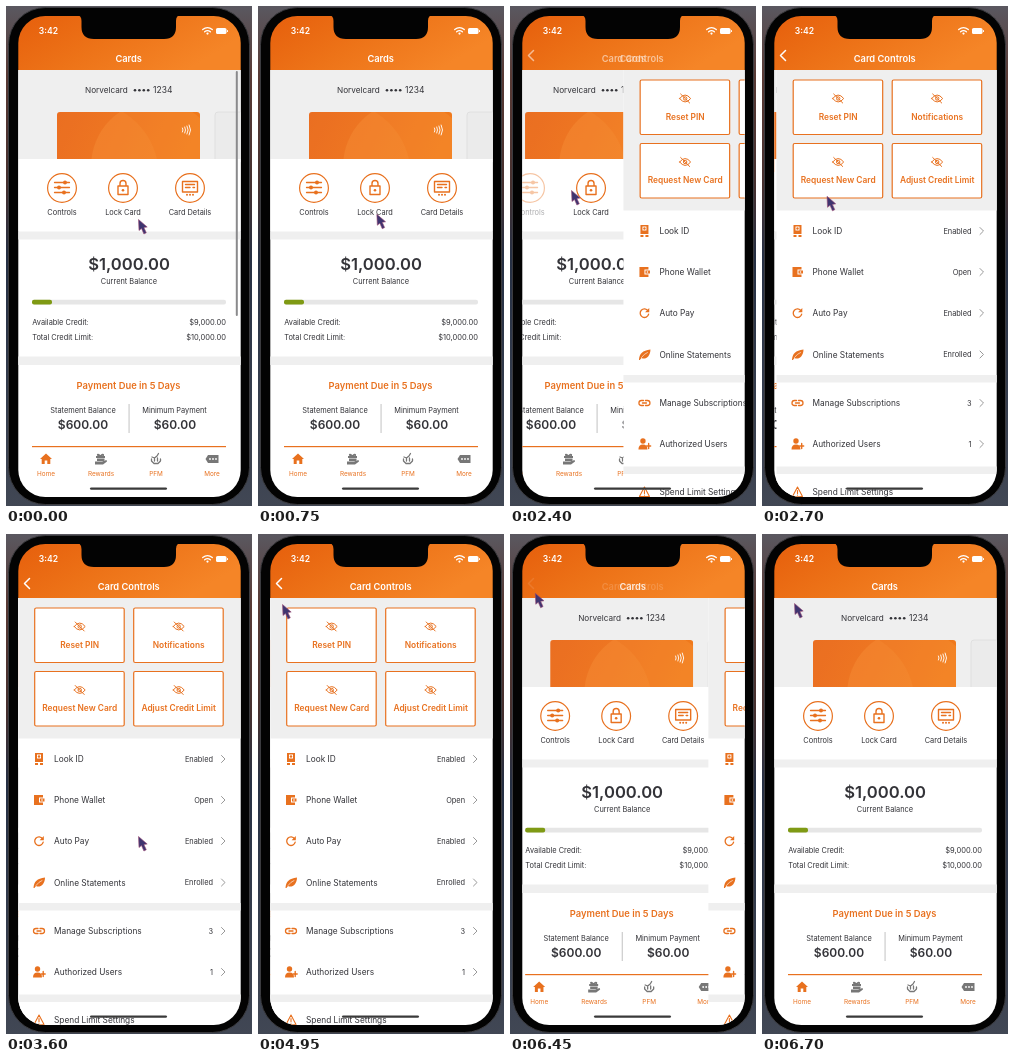
Write an HTML page that moves like this. It is 246 by 500 pixels and loops after 6.75 s.

```html
<!DOCTYPE html>
<html lang="en">
<head>
<meta charset="utf-8">
<title>Card controls</title>
<style>
  html, body { margin: 0; width: 100%; height: 100%; overflow: hidden; background: #0d1320; }
  svg { display: block; width: 246px; height: 500px; }
  text { font-family: Inter, Roboto, sans-serif; }
</style>
</head>
<body>
<svg id="stage" viewBox="0 0 246 500"></svg>
<script>
const ORANGE = '#e8711f', INK = '#333338', GRAY = '#efefef', DIM = '#777';

const text = (x, y, str, size = 7.5, o = {}) =>
  `<text x="${x}" y="${y}" font-size="${size}" fill="${o.fill || INK}" font-weight="${o.weight || 400}" text-anchor="${o.anchor || 'middle'}">${str}</text>`;
const rect = (x, y, w, h, fill, rx = 0, more = '') =>
  `<rect x="${x}" y="${y}" width="${w}" height="${h}" fill="${fill}" rx="${rx}" ${more}/>`;
const band = (y, h, fill) => rect(12, y, 223, h, fill);
const line = (d, color = ORANGE, width = 1) =>
  `<path d="${d}" fill="none" stroke="${color}" stroke-width="${width}" stroke-linecap="round" stroke-linejoin="round"/>`;
const solid = (d, color = ORANGE) => `<path d="${d}" fill="${color}" fill-rule="evenodd"/>`;
const dot = (x, y, r, fill = ORANGE) => `<circle cx="${x}" cy="${y}" r="${r}" fill="${fill}"/>`;
const at = (x, y, body) => `<g transform="translate(${x} ${y})">${body}</g>`;

// Icons are drawn around their own centre
const icons = {
  sliders: line('M-7.5-5H7.5M-7.5 0H7.5M-7.5 5H7.5', ORANGE, 1.3) + dot(3, -5, 2) + dot(-3, 0, 2) + dot(2, 5, 2),
  lock: line('M-5-1.5H5V7H-5ZM-3-1.5V-4A3 3 0 0 1 3-4V-1.5', ORANGE, 1.4) + dot(0, 2.7, 1.3),
  details: line('M-7.5-6H7.5V4.5H-7.5Z', ORANGE, 1.4) + line('M-4.5-3H4.5M-4.5 0H0M3 0H4.5', ORANGE, 1.4) + dot(-3, 7.3, 1) + dot(0, 7.3, 1) + dot(3, 7.3, 1),
  home: solid('M0-5.5L6 0H4.3V5H1.3V1.5H-1.3V5H-4.3V0H-6Z'),
  gift: solid('M-5-3H4V-1H-5ZM-4-.5H3.5V2H-4ZM-6 2.5H1L5.5 1L6 2.5L2 5.5H-6Z', DIM) + line('M-.5-3C-5-7-4-2-.5-3C3-7 4-2-.5-3', DIM, 1.2),
  chart: line('M-4.5 0V2L-2 4.5H2L4.5 2V0M-1.5 0V2M1.5-1V2M-4-2L-1.5-1L1-3L2.5-5.5', DIM, 1.3),
  more: solid('M-6.5 0L-4-4H6.5V4H-4Z', DIM) + dot(-2, 0, .9, '#fff') + dot(1, 0, .9, '#fff') + dot(4, 0, .9, '#fff'),
  eye: line('M-5.5 0Q0-7 5.5 0Q0 7-5.5 0ZM-4.5-4.5L4.5 4.5', ORANGE, 1) + `<circle r="1.7" fill="none" stroke="${ORANGE}"/>`,
  scan: solid('M-4-6H4V3H-4ZM-2-4.5V-.5H2V-4.5ZM-4 4H-1V6H-4ZM1 4H4V6H1Z') + dot(0, -2.5, 1.2),
  wallet: solid('M-5-5H4V-2.5H0V2.5H4V5H-5ZM1-1.6H5.5V1.6H1Z') + dot(3, 0, .8, '#fff'),
  refresh: line('M3.6-2.2A4.3 4.3 0 1 0 4.2 1.2', ORANGE, 1.3) + solid('M4.8-5V-.8H.6Z'),
  leaf: solid('M-5.5 5.5C-5-1-2-4 6-5C6 2 1 5.5-3 3.5L-4.6 5.6Z') + line('M-3 3Q0-1 3-2', '#fff', .6),
  link: line('M-1-2.5H-3A2.5 2.5 0 0 0-3 2.5H-1M1-2.5H3A2.5 2.5 0 0 1 3 2.5H1M-2 0H2', ORANGE, 1.3),
  users: dot(-1.5, -3, 2.7) + solid('M-6 5.5Q-6 .5-1.5.5Q3 .5 3 5.5Z') + line('M4.2-.5V4.5M2.2 2H6.2', ORANGE, 1.4),
  warn: line('M0-5L5 4.5H-5ZM0-1.5V1.5M0 3V3.1', ORANGE, 1.1)
};

const action = (x, icon, label, id = '') =>
  `<g ${id && `id="${id}"`}><circle cx="${x}" cy="182" r="14.4" fill="#fff" stroke="${ORANGE}" stroke-width="1.2"/>` +
  at(x, 181.5, icons[icon]) + text(x, 209, label, 7.4) + '</g>';
const tab = (x, icon, label) => at(x, 453, icons[icon]) + text(x, 470, label, 6.4, { fill: ORANGE });
const tile = (x, y, label) =>
  rect(x, y, 89.5, 54.5, '#fff', 1.5, `stroke="${ORANGE}" stroke-width="1.2"`) +
  at(x + 45, y + 18.5, icons.eye) + text(x + 45, y + 39.5, label, 8.4, { fill: ORANGE, weight: 600 });
const row = (y, icon, label, value) =>
  at(33, y, icons[icon]) + text(48, y + 3, label, 8.3, { anchor: 'start' }) +
  (value ? text(207, y + 2.8, value, 7.4, { anchor: 'end' }) + line(`M215.5 ${y - 3.5}L219 ${y}L215.5 ${y + 3.5}`, '#999', 1) : '');
const amount = (y, label, value) =>
  text(26.2, y, label, 7.4, { anchor: 'start' }) + text(220, y, value, 7.5, { anchor: 'end' });

const cards =
  band(64, 427, '#fff') + band(64, 89, GRAY) +
  text(79, 87, 'Norvelcard', 8.2, { anchor: 'start' }) +
  [129, 133.4, 137.8, 142.2].map(x => dot(x, 84.3, 1.3, INK)).join('') +
  text(147, 87, '1234', 8.5, { anchor: 'start' }) +
  `<g clip-path="url(#cardClip)">${rect(51, 106, 143, 60, 'url(#card)')}
    <circle cx="78" cy="170" r="75" fill="#ffa850" opacity=".12"/>
    <circle cx="150" cy="160" r="65" fill="#ffa850" opacity=".2"/></g>` +
  line('M176.5 122Q177.6 124 176.5 126M178.8 121Q180.4 124 178.8 127M181 120Q183.3 124 181 128M183.2 119Q186 124 183.2 129', '#fff', .9) +
  rect(209, 106, 28, 50, '#ebebeb', 3, 'stroke="#dcdcdc" stroke-width=".8"') +
  band(153, 72.5, '#fff') +
  action(56, 'sliders', 'Controls', 'controls') + action(117, 'lock', 'Lock Card') + action(184, 'details', 'Card Details') +
  band(225.5, 8, GRAY) +
  text(123, 264, '$1,000.00', 16.6, { weight: 600 }) + text(123, 278, 'Current Balance', 7.4) +
  rect(26, 293.7, 194, 4.8, '#e6e6e6', 2) + rect(26, 293.7, 20, 4.8, '#7f9a14', 2) +
  amount(319, 'Available Credit:', '$9,000.00') + amount(334, 'Total Credit Limit:', '$10,000.00') +
  band(350.5, 8.5, GRAY) +
  text(122.5, 383, 'Payment Due in 5 Days', 9.4, { fill: ORANGE, weight: 600 }) +
  text(77, 407, 'Statement Balance', 7.4) + text(77, 423, '$600.00', 12, { weight: 600 }) +
  text(168.5, 407, 'Minimum Payment', 7.4) + text(169, 423, '$60.00', 12, { weight: 600 }) +
  rect(122.6, 398, .9, 29, '#bbb') + rect(26, 440, 194, 1.2, ORANGE) +
  tab(40, 'home', 'Home') + tab(95, 'gift', 'Rewards') + tab(150, 'chart', 'PFM') + tab(206, 'more', 'More');

const controlsPage =
  band(64, 427, '#fff') + band(64, 140.5, GRAY) +
  tile(28.7, 74, 'Reset PIN') + tile(127.7, 74, 'Notifications') +
  tile(28.7, 137.5, 'Request New Card') + tile(127.7, 137.5, 'Adjust Credit Limit') +
  row(225, 'scan', 'Look ID', 'Enabled') + row(266, 'wallet', 'Phone Wallet', 'Open') +
  row(307, 'refresh', 'Auto Pay', 'Enabled') + row(348.5, 'leaf', 'Online Statements', 'Enrolled') +
  band(369, 7.5, GRAY) +
  row(397, 'link', 'Manage Subscriptions', '3') + row(438, 'users', 'Authorized Users', '1') +
  band(460.5, 7.5, GRAY) +
  row(486, 'warn', 'Spend Limit Settings');

const white = { fill: '#fff', weight: 600 };
const stage = document.getElementById('stage');
stage.innerHTML = `
<defs>
  <linearGradient id="head" x2="1" y2=".4"><stop stop-color="#e65f0c"/><stop offset=".5" stop-color="#ed7318"/><stop offset="1" stop-color="#f58527"/></linearGradient>
  <linearGradient id="card" x2="1" y2=".2"><stop stop-color="#e7651a"/><stop offset="1" stop-color="#f07a1c"/></linearGradient>
  <linearGradient id="wall" x2="0" y2="1"><stop stop-color="#5a5860"/><stop offset=".14" stop-color="#593a35"/><stop offset=".36" stop-color="#46302f"/><stop offset=".5" stop-color="#263044"/><stop offset="1" stop-color="#414754"/></linearGradient>
  <clipPath id="screen"><rect x="12.3" y="10" width="222.4" height="481" rx="27"/></clipPath>
  <clipPath id="cardClip"><rect x="51" y="106" width="143" height="60" rx="3"/></clipPath>
</defs>
${rect(0, 0, 246, 500, 'url(#wall)')}
${rect(2.5, 1.5, 241, 497, '#030303', 37, 'stroke="#3c3c40" stroke-width="1"')}
<g clip-path="url(#screen)">
  <g id="pageA">${cards}</g>
  <g id="pageB">${controlsPage}</g>
  ${band(10, 54, 'url(#head)')}
  <g id="titleA">${text(122.7, 56, 'Cards', 9.3, white)}</g>
  <g id="titleB">${text(122.7, 56, 'Card Controls', 9.3, white)}</g>
  <g id="back">${line('M23.5 44.5L18.5 49.5L23.5 54.5', '#fff', 1.5)}</g>
  <g id="scrollbar">${rect(229.8, 65, 2, 245, '#8a8a8c', 1)}</g>
  ${text(42.5, 28, '3:42', 8.6, white)}
  ${line('M196.7 23.6Q201.5 19.6 206.3 23.6M198.6 25.8Q201.5 23.4 204.4 25.8', '#fff', 1.3)}${dot(201.5, 27.6, 1.1, '#fff')}
  ${rect(210, 22, 10.5, 6, '#fff', 1.6)}${rect(221, 24, 1, 2, '#fff', .5)}
  ${rect(84, 481.4, 77, 2.4, '#3a3a3a', 1.2)}
</g>
<path d="M71 9Q75.5 9.5 75.5 15V21Q75.5 33 88 33H158Q170 33 170 21V15Q170 9.5 174.5 9Z" fill="#030303"/>
<path id="cursor" d="M.5.5L1 11.5L3.5 9.5L5.9 15L8.3 13.8L5.9 8.6L9.2 8Z" fill="#3f3570" stroke="#9a4a74" stroke-width=".6"/>`;

const LOOP = 6750;
const el = id => document.getElementById(id);
const ramp = (t, a, b) => Math.min(1, Math.max(0, (t - a) / (b - a)));
const easeOut = p => 1 - (1 - p) ** 3;
const easeInOut = p => p * p * (3 - 2 * p);
const move = (id, x, y = 0) => el(id).setAttribute('transform', `translate(${x} ${y})`);
const fade = (id, o) => el(id).setAttribute('opacity', o);

// Pointer stops: time, x, y
const stops = [
  [0, 132, 213], [500, 132, 213], [1350, 67, 188], [1650, 67, 188], [2050, 61, 184], [2600, 61, 184],
  [3350, 132, 302], [3900, 132, 302], [4800, 24, 70], [5100, 24, 70], [5600, 20, 52], [6300, 20, 52],
  [6650, 32, 69], [LOOP, 32, 69]
];

function pointer(t) {
  const i = stops.findIndex(s => s[0] > t);
  const [t0, x0, y0] = stops[i - 1], [t1, x1, y1] = stops[i];
  const p = easeInOut(ramp(t, t0, t1));
  return [x0 + (x1 - x0) * p, y0 + (y1 - y0) * p];
}

function draw(now) {
  const t = now % LOOP;
  const open = easeOut(ramp(t, 2274, 2824)) - easeOut(ramp(t, 6270, 6670));
  move('pageA', -66 * open);
  move('pageB', 223 * (1 - open));
  fade('titleA', 1 - open);
  fade('titleB', open);
  fade('back', open * (1 - .4 * ramp(t, 6120, 6200)));
  fade('controls', 1 - .6 * (ramp(t, 2120, 2220) - ramp(t, 2500, 2800)));
  fade('scrollbar', 1 - ramp(t, 400, 700));
  move('cursor', ...pointer(t));
  requestAnimationFrame(draw);
}
requestAnimationFrame(draw);
</script>
</body>
</html>
```
